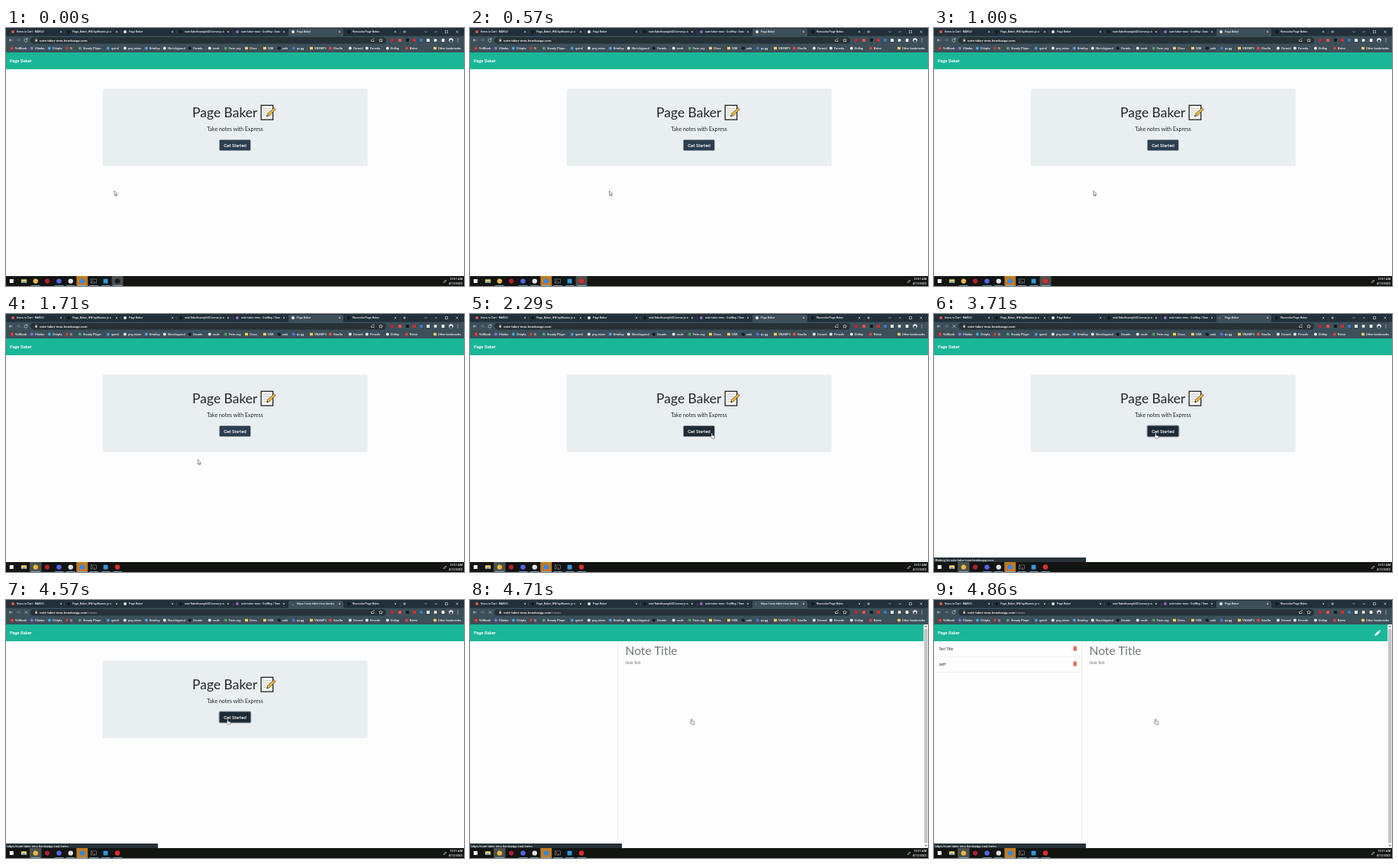
These frames come from a looping animation (600 by 338 pixels, 5010 ms). An HTML page:

```html
<!DOCTYPE html>
<html lang="en">
<head>
<meta charset="utf-8">
<title>Page Baker</title>
<style>
html, body { margin: 0; width: 100%; height: 100%; overflow: hidden; background: #fdfdfd; }
svg { display: block; width: 100vw; height: 100vh; }
text { white-space: pre; }
.ui { font-family: Roboto, "Open Sans", sans-serif; font-weight: 500; }
.page { font-family: Lato, sans-serif; }
.line { fill: none; stroke: #e2e7ea; stroke-width: .6; }
#button { paint-order: stroke; stroke-width: 2; }
</style>
</head>
<body>
<svg id="stage" viewBox="0 0 600 338" preserveAspectRatio="none"></svg>
<script>
const LOOP = 5010, STEPS = 35, STEPS_PER_MS = 7 / 1000;
const HOST = 'note-taker-rimo.herokuapp.com';
const APP = 'Page Baker';
const STRIP = '#22303a', TOOLBAR = '#3d4f59', DARK = '#263238';

// Markup helpers; text is placed by its vertical centre.
const rect = (x, y, w, h, fill, extra = '') =>
  `<rect x="${x}" y="${y}" width="${w}" height="${h}" fill="${fill}" ${extra}/>`;
const dot = (x, y, r, fill) => `<circle cx="${x}" cy="${y}" r="${r}" fill="${fill}"/>`;
const path = (d, extra = 'class="line"') => `<path d="${d}" ${extra}/>`;
const label = (x, y, size, str, fill = '#f0f3f4', font = 'ui', extra = '') =>
  `<text class="${font}" x="${x}" y="${y + size * .35}" font-size="${size}" fill="${fill}" ${extra}>${str}</text>`;
const group = (id, body, extra = '') => `<g id="${id}" ${extra}>${body}</g>`;
const cross = (x, y, r = 1.1) => path(`M${x - r} ${y - r}l${2 * r} ${2 * r}m0 ${-2 * r}l${-2 * r} ${2 * r}`);

function tabStrip() {
  const tabs = [
    [9, 'Items in Cart - MARLO', 72, '#e8514d'],
    [82, 'Page_Baker_HW/apiRoutes.js a', 145, '#15191c'],
    [156, APP, 218, '#e4e8ea'],
    [229, 'noteTakerExample02/server.js a', 291, '#15191c'],
    [303, 'note-taker-rimo - CodNep | Vam', 364, '#8e6bb5'],
    [376, '', 437, ''],
    [449, 'Rimosela/Page-Baker', 510, '#15191c'],
  ];
  let out = rect(0, 0, 600, 11, STRIP) +
    path('M369 11Q370 11 370 9V3Q370 1 372 1H440Q442 1 442 3V9Q442 11 443 11Z', `fill="${TOOLBAR}"`);
  for (const [x, title, close, color] of tabs) {
    if (color) out += dot(x, 5, 2, color);
    out += label(x + 5, 5, 3.6, title) + cross(close, 5);
  }
  for (const x of [76, 150, 223, 297, 516]) out += rect(x, 3, .4, 5, '#55656d');
  return out + path('M520 5h4m-2 -2v4M548.5 4.2l1.5 1.5l1.5 -1.5M561.5 5h3.4M575.5 3.5h3v3h-3z') + cross(591, 5, 1.5);
}

function toolbar() {
  let out = rect(0, 10.5, 600, 21.5, TOOLBAR) +
    rect(32, 12, 466, 8.5, DARK, 'rx="4.2"') +
    path('M8.5 16H4.2m2 -2l-2 2l2 2') +
    path('M14 16h4.3m-2 -2l2 2l-2 2', 'fill="none" stroke="#84929a" stroke-width=".6"') +
    rect(38.3, 15.6, 2.6, 2, '#dfe4e6') + path('M38.8 15.6v-1q.8 -1 1.6 0v1') +
    path('M478.5 15v2.5h3.5v-2m-2 0q.2 -2 2.6 -2') +
    path('M491 13.8l.7 1.5l1.7 .2l-1.2 1.1l.3 1.6l-1.5 -.8l-1.5 .8l.3 -1.6l-1.2 -1.1l1.7 -.2z') +
    label(44, 16, 4.4, `${HOST}<tspan id="route" fill="#8f9ca3">/notes</tspan>`, '#fff');
  const extensions = [[506, '#c3272f'], [516, '#e2554a'], [526, '#15191c'], [535, '#d02f35'], [544, '#3b78c2'], [553, '#e4e8ea']];
  for (const [x, color] of extensions) out += rect(x - 2, 14, 4, 4, color, 'rx=".5"');
  out += rect(560.8, 14.3, 3.5, 3.5, '#fff', 'rx=".8"') + rect(570.8, 14, 3.5, 4, '#fff') +
    dot(583, 16, 2.8, '#e8ebed') + dot(583, 17, 1.6, '#1d272c');
  for (const y of [14.3, 16, 17.7]) out += dot(592, y, .5, '#eef1f2');
  return out;
}

function bookmarks() {
  const items = [
    [12, 'VidNook', '#e63b36'], [38, 'Glimbo', '#9b64dc'], [61, 'Chirpla', '#3ca8e5'],
    [84, 'Q', '#b9473e'], [101, 'Steady Player', '#4fa66c'], [138, 'quirel', '#3d9fd3'],
    [160, 'png mixer', '#e4e8ea'], [188, 'Brimlop', '#5d9fd9'], [212, 'Sketchypond', '#e4e8ea'],
    [245, 'Orvado', '#15191c'], [271, 'node', '#e4e8ea'], [292, 'Fenn.org', '#45a55b'],
    [319, 'Class', '#f0cc62'], [343, 'VRK', '#f0cc62'], [362, 'zobi', '#12191d'],
    [381, 'qv.gg', '#4677d7'], [404, 'VN2MP3', '#f0cc62'], [429, 'Givello', '#e94b40'],
    [455, 'Ovrand', '#e4e8ea'], [477, 'Fimarlo', '#e4e8ea'], [504, 'Drillup', '#e4e8ea'],
    [529, 'Balmi', '#d6443c'], [566, 'Other bookmarks', '#f0cc62'],
  ];
  return items.map(([x, name, color]) =>
    (color === '#f0cc62' ? rect(x - 6, 24.8, 4, 3.4, color) : dot(x - 4.2, 26.5, 2, color)) +
    label(x, 26.5, 3.9, name)).join('');
}

const navbar = width => rect(0, 32, width, 22, '#1ab698') +
  label(5, 43.2, 5.86, APP, '#fff', 'page', 'stroke="#fff" stroke-width=".12"');

function memo() {
  let out = rect(334.2, 101.3, 15.5, 18.8, '#f5f5f2', 'stroke="#222" stroke-width="1.3"');
  for (const y of [105, 108, 111, 114]) out += rect(336.8, y, 10, .7, '#b4babc');
  return out +
    path('M341.6 116l1 -3.4l8.6 -8l2 2.1l-8.3 8.1z', 'fill="#f2b632" stroke="#222" stroke-width=".6"') +
    path('M341.6 116l.5 -1.8l1.2 1.2z', 'fill="#222"') +
    path('M349.9 105.8l1.3 -1.2l2 2.1l-1.3 1.3z', 'fill="#d98a77"');
}

function homePage() {
  return navbar(600) +
    rect(126.6, 79.5, 347, 101.3, '#e9eef0', 'rx="1.5"') +
    label(244, 110.4, 17.5, APP, '#23282c', 'page') + memo() +
    label(300, 132.8, 7.03, 'Take notes with Express', '#23282c', 'page', 'text-anchor="middle"') +
    rect(279.6, 146.4, 40.8, 14.2, '#2c3e50', 'rx="1.3" id="button"') +
    label(300, 153.7, 5.86, 'Get Started', '#fff', 'page', 'text-anchor="middle" stroke="#fff" stroke-width=".1"');
}

function trash(x, y) {
  return rect(x - 2.4, y - 2.7, 4.8, .8, '#e74c3c') + rect(x - 1, y - 3.2, 2, .7, '#e74c3c') +
    rect(x - 2, y - 1.5, 4, 4.6, '#e74c3c', 'rx=".5"') +
    path(`M${x - .8} ${y - .7}v3m1.6 0v-3`, 'stroke="#f6b5ae" stroke-width=".35"');
}

function notesPage() {
  const item = (y, name) => label(6.5, y, 4.69, name, '#24292d', 'page') + trash(184.8, y - .5) +
    rect(0, y + 10, 193, .4, '#dcdfe1');
  return rect(0, 32, 600, 293, '#fdfdfd') + navbar(594.5) +
    rect(193, 54, .5, 271, '#d9dcde') +
    label(203.5, 66.5, 15.6, 'Note Title', '#70777c', 'page') +
    label(203.5, 82.3, 4.69, 'Note Text', '#70777c', 'page') +
    rect(594.5, 32, 5.5, 293, '#f1f1f1') + rect(595.2, 38, 4.1, 280, '#c3c3c3') +
    path('M595.8 35.5h3l-1.5 -2zM595.8 321h3l-1.5 2z', 'fill="#666"') +
    group('loaded', item(64, 'Test Title') + item(84, 'asdf') +
      path('M577.3 47l.6 -2.6l4.1 -4l2 2l-4.1 4zM582.6 39.8l.8 -.8l2 2l-.8 .8z', 'fill="#fff"'));
}

function taskbar() {
  let out = rect(0, 325, 600, 13, '#131513') +
    rect(31, 325, 15.5, 13, '#4c504d', 'id="browserFocus"') +
    rect(138.5, 325, 15, 13, '#4c504d', 'id="recorderFocus"') +
    rect(92.3, 325, 14.8, 13, '#c17a24') +
    rect(4.8, 329, 5, 5, '#f2f4f5') +
    rect(20, 329.3, 7, 4.6, '#f2cd69') + rect(21.5, 332, 4, 1.9, '#4a9bd5') +
    dot(38.8, 331.6, 3.2, '#e7ba3e') + dot(54, 331.6, 3.1, '#b3202c') +
    dot(69.4, 331.6, 3.2, '#5865e8') + dot(84.7, 331.6, 3.2, '#dfe4e2') +
    dot(99.8, 331.6, 3.2, '#3687ea') +
    rect(111.7, 329, 7, 5, '#070808', 'stroke="#b9bebf" stroke-width=".5"') +
    path('M113 330.5l1.2 1l-1.2 1m2 .3h1.7') +
    rect(127.6, 328.7, 5.8, 5.8, '#2e9be0') +
    dot(146, 331.6, 3.3, '#191c1e') + group('recording', dot(146, 331.6, 3.3, '#d52d30'));
  for (const x of [33, 64, 79, 94, 109.5, 125, 140.5]) out += rect(x, 337.2, 11.5, .8, '#79b7e4');
  return out + path('M573 333l3 -3l1 1l-3 3z') +
    label(598, 328.8, 3.85, '10:51 AM', '#f0f2f3', 'ui', 'text-anchor="end"') +
    label(598, 334.8, 3.85, '4/12/2022', '#f0f2f3', 'ui', 'text-anchor="end"');
}

const pointers =
  group('arrow', path('M0 0V6.2L1.4 5L2.3 7L3.2 6.6L2.3 4.6H4.2Z', 'fill="#fff" stroke="#222" stroke-width=".5"')) +
  group('hand', path('M-.3 .5Q.5 -.3 1.1 .5V3L3.6 3.5Q4.3 3.7 4.1 4.5L3.5 7H.5L-1.4 4.5Q-1.3 3.5 -.3 4.2Z',
    'fill="#fff" stroke="#222" stroke-width=".5"'));

const stage = document.getElementById('stage');
stage.innerHTML = rect(0, 0, 600, 338, '#fdfdfd') + tabStrip() + toolbar() + bookmarks() +
  group('globe', dot(376, 5, 2, '#e4e8ea')) +
  group('spinner', path('M376 3.2a1.8 1.8 0 0 1 1.8 1.8', 'fill="none" stroke="#9aa8af" stroke-width=".6"')) +
  label(381, 5, 3.6, APP, '#f0f3f4', 'ui', 'id="tabTitle"') +
  group('reload', path('M27.6 14.7a2.1 2.1 0 1 0 .5 1.6M28 13.3v1.7h-1.7')) +
  group('stop', cross(26.5, 16, 1.7)) +
  group('home', homePage()) + group('notes', notesPage()) +
  group('status', rect(0, 319, 199, 6, DARK) + label(1.5, 322.2, 3.95, '', '#f0f3f4', 'ui', 'id="statusText"')) +
  taskbar() + group('cursor', pointers);

const el = id => document.getElementById(id);
const show = (id, on) => el(id).setAttribute('display', on ? 'inline' : 'none');
const setText = (id, str) => { if (el(id).textContent !== str) el(id).textContent = str; };

// Pointer stops: [step, x, y]
const stops = [[0, 142, 213.3], [7, 209, 213.3], [9, 209, 213.3],
  [16, 316.5, 156], [19, 308.7, 154], [26, 290, 156], [35, 290, 156]];

function pointerAt(step) {
  const i = stops.findIndex(s => s[0] > step) - 1;
  const [a, ax, ay] = stops[i], [b, bx, by] = stops[i + 1];
  const k = (step - a) / (b - a), eased = k * k * (3 - 2 * k);
  return [ax + (bx - ax) * eased, ay + (by - ay) * eased];
}

function draw(now) {
  const time = now % LOOP;
  const step = Math.min(STEPS - 1, Math.floor((time + 6) * STEPS_PER_MS));
  const clicked = step >= 18, routed = step >= 31, arrived = step >= 33, done = step >= 34;
  const loading = clicked && !done;
  const [x, y] = pointerAt(step);
  const hover = x > 279 && x < 321 && y > 146 && y < 161;

  el('cursor').setAttribute('transform', `translate(${x} ${y})`);
  show('arrow', !hover);
  show('hand', hover);
  const button = el('button');
  button.setAttribute('fill', hover ? '#1e2b37' : '#2c3e50');
  button.setAttribute('stroke', clicked ? '#9ba5ad' : 'none');

  show('recording', step >= 1);
  show('recorderFocus', step < 8);
  show('browserFocus', step >= 8);

  show('stop', loading);
  show('reload', !loading);
  show('spinner', loading);
  show('globe', !loading);
  el('spinner').setAttribute('transform', `rotate(${step * 50} 376 5)`);
  setText('tabTitle', routed && !done ? 'https://note-taker-rimo.heroku' : APP);
  show('route', routed);

  show('status', clicked);
  setText('statusText', routed ? `https://${HOST}/notes` : `Waiting for ${HOST}...`);
  show('home', !arrived);
  show('notes', arrived);
  show('loaded', done);
}

const start = performance.now();
function tick() {
  draw(performance.now() - start);
  requestAnimationFrame(tick);
}
tick();
</script>
</body>
</html>
```
